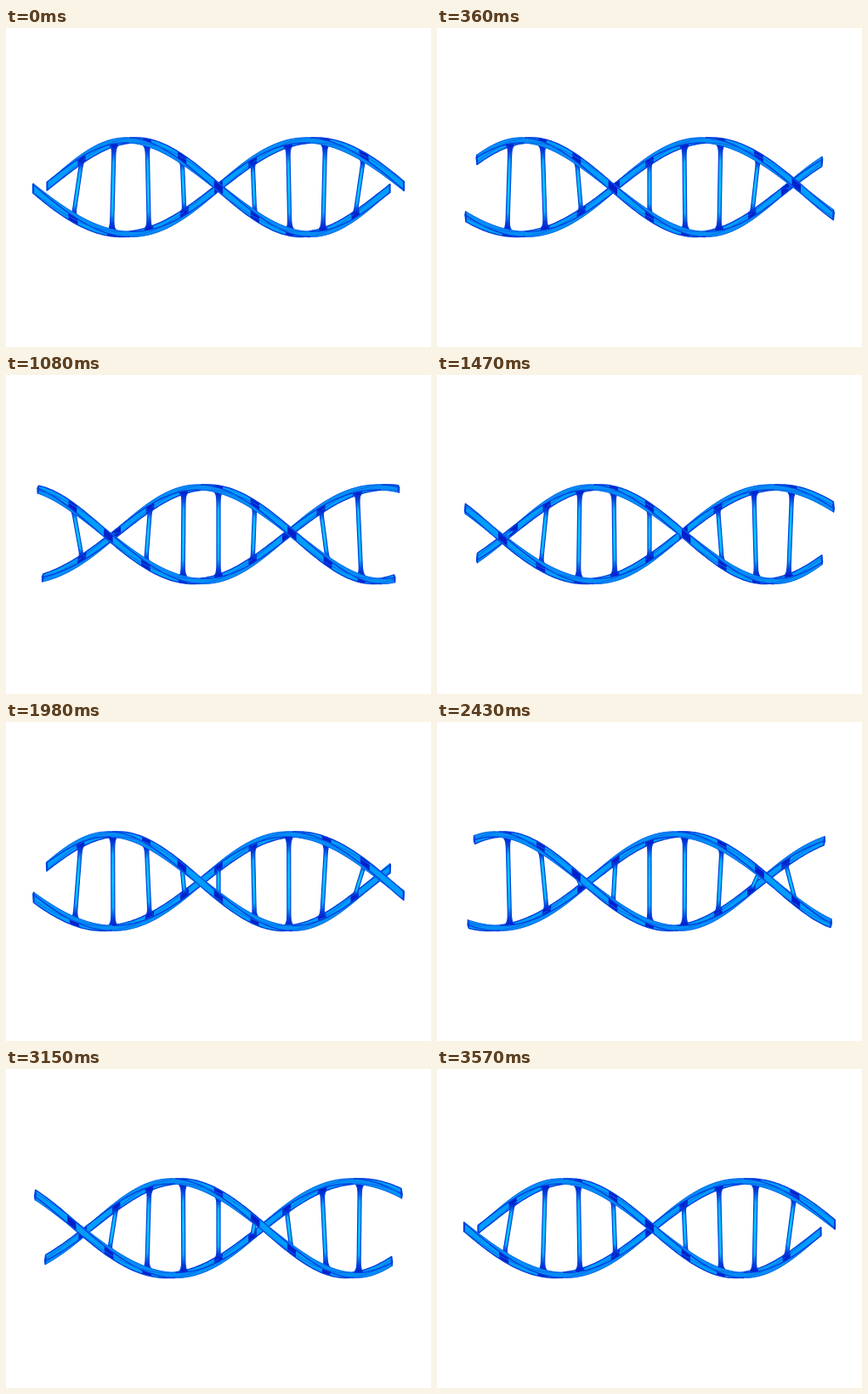
Animation of 500x375 px, one loop 3600 ms. Source, as an HTML page with a canvas:

```html
<!DOCTYPE html>
<html lang="en">
<head>
<meta charset="utf-8">
<title>Double helix</title>
<style>
  html, body { margin: 0; width: 100%; height: 100%; overflow: hidden; background: #fff; }
  canvas { display: block; width: 500px; height: 375px; }
</style>
</head>
<body>
<canvas id="stage" width="500" height="375"></canvas>
<script>
const ctx = document.getElementById('stage').getContext('2d');
const LOOP = 3600, STEP = 30;
const CX = 250, CY = 187.2, CAMERA = 1400;
const HALF = 209.5, WAVE = 422, RADIUS = 55;
const THICK = 3.1, WIDE = 5;          // half sizes of the strand's section
const RUNG_GAP = 41.4, RUNGS = 4, SAMPLES = 140;
const FACE = '#009dfb', SIDE = '#048ef5', EDGE = '#003fdc', HIDDEN = '#0668ec', JOINT = '#0420cc';
const CORNERS = [[1, -1], [1, 1], [-1, 1], [-1, -1]];

const angle = (x, turn) => x / WAVE * 2 * Math.PI + turn;

function project(x, y, z) {
  const s = CAMERA / (CAMERA - z);
  return [CX + x * s, CY + y * s];
}

function corner(x, turn, [r, w]) {
  const a = angle(x, turn), rad = RADIUS + r * THICK, tan = w * WIDE;
  return project(x, rad * Math.sin(a) + tan * Math.cos(a),
                    rad * Math.cos(a) - tan * Math.sin(a));
}

function trace(points, close) {
  ctx.beginPath();
  points.forEach(p => ctx.lineTo(p[0], p[1]));
  if (close) ctx.closePath();
}

function fill(points, color) {
  trace(points, true);
  ctx.fillStyle = color;
  ctx.fill();
}

function line(points, color, width, close) {
  trace(points, close);
  ctx.strokeStyle = color;
  ctx.lineWidth = width;
  ctx.stroke();
}

const rail = (xs, turn, c) => xs.map(x => corner(x, turn, CORNERS[c]));

function fillFace(xs, turn, c, color) {
  fill([...rail(xs, turn, c), ...rail(xs, turn, (c + 1) % 4).reverse()], color);
}

// Stretches of a strand that lie in the near or the far half
function stretches(turn, near) {
  const list = [];
  let run = [];
  for (let i = 0; i <= SAMPLES; i++) {
    const x = -HALF + 2 * HALF * i / SAMPLES;
    const inside = Math.cos(angle(x, turn)) >= 0 === near;
    if (inside || run.length) run.push(x);
    if (!inside && run.length) {
      list.push(run);
      run = [];
    }
  }
  if (run.length) list.push(run);
  return list.filter(r => r.length > 1);
}

function drawStrand(turn, near) {
  const front = near ? 0 : 2;
  for (const xs of stretches(turn, near)) {
    [1, 3, 2 - front].forEach(c => fillFace(xs, turn, c, SIDE));
    fillFace(xs, turn, front, FACE);

    for (let k = -RUNGS; k <= RUNGS; k++) {
      const x = k * RUNG_GAP;
      if (x < xs[0] || x > xs[xs.length - 1]) continue;
      const span = [-5, 0, 5].map(d => x + d);
      fillFace(span, turn, front, JOINT);
    }

    for (let c = 0; c < 4; c++) {
      const shown = c === front || c === front + 1;
      line(rail(xs, turn, c), shown ? EDGE : HIDDEN, shown ? 1.4 : 1);
    }
    for (const x of [-HALF, HALF]) {
      if (x !== xs[0] && x !== xs[xs.length - 1]) continue;
      const cap = CORNERS.map(c => corner(x, turn, c));
      fill(cap, '#0060e6');
      line(cap, EDGE, 1.2, true);
    }
  }
}

function drawRung(x, turn) {
  const a = angle(x, turn), r = RADIUS - THICK;
  const left = [], right = [];
  for (let i = 0; i <= 32; i++) {
    const u = i / 16 - 1;
    const [px, py] = project(x, u * r * Math.sin(a), u * r * Math.cos(a));
    const w = 2 + 2.8 * Math.abs(u) ** 14;
    left.push([px - w, py]);
    right.push([px + w, py]);
  }
  const shade = ctx.createLinearGradient(0, left[0][1], 0, left[32][1]);
  [[0, JOINT], [0.08, '#0440dc'], [0.2, '#00b4fc'], [0.5, '#00ccff'],
   [0.8, '#00b4fc'], [0.92, '#0440dc'], [1, JOINT]]
    .forEach(([at, color]) => shade.addColorStop(at, color));
  fill([...left, ...right.reverse()], shade);
  line(left, '#0040dc', 1.2);
  line(right, '#0040dc', 1.2);
}

function draw(time) {
  const turn = time / LOOP * 2 * Math.PI;
  const strands = [turn, turn + Math.PI];
  ctx.fillStyle = '#fff';
  ctx.fillRect(0, 0, 500, 375);
  ctx.lineJoin = 'round';
  strands.forEach(s => drawStrand(s, false));
  for (let k = -RUNGS; k <= RUNGS; k++) drawRung(k * RUNG_GAP, turn);
  strands.forEach(s => drawStrand(s, true));
}

const start = performance.now();
function tick() {
  const t = (performance.now() - start) % LOOP;
  draw(Math.floor(t / STEP) * STEP);
  requestAnimationFrame(tick);
}
tick();
</script>
</body>
</html>
```
